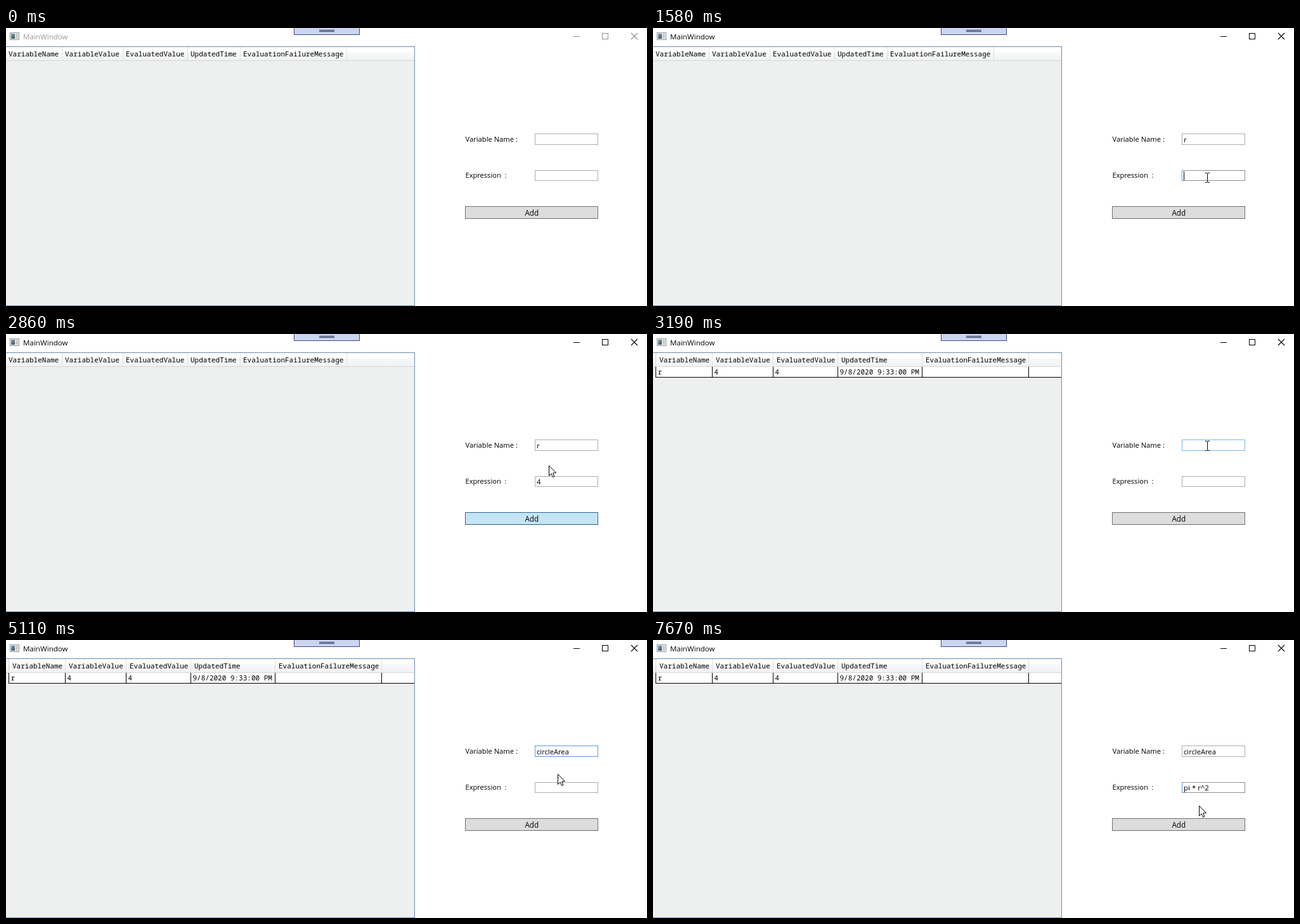
Recreate the animation shown at these times as an HTML page with a canvas. Size 1011x440 px, loop 8 s.

```html
<!DOCTYPE html>
<html lang="en">
<head>
<meta charset="utf-8">
<title>MainWindow</title>
<style>
  html, body { margin: 0; width: 100%; height: 100%; overflow: hidden; background: #fff; }
  canvas { display: block; }
</style>
</head>
<body>
<canvas id="stage" width="1011" height="440"></canvas>
<script>
const ctx = document.getElementById('stage').getContext('2d');
const LOOP = 8000;
const UI = '"Open Sans", "Noto Sans", sans-serif';
const MONO = '"Noto Sans Mono", "Liberation Mono", monospace';
const IDLE = '#abadb3', HOVER = '#7eb4ea', FOCUS = '#569de5';

// Each step changes part of the state and holds until the next one.
const steps = [
  [0, { active: false, name: '', expr: '', nameEdge: IDLE, exprEdge: IDLE,
        caret: null, cursor: null, pressed: false, row: false }],
  [300, { nameEdge: HOVER, cursor: ['beam', 881, 176] }],
  [630, { active: true, nameEdge: FOCUS, caret: 'name', cursor: ['beam', 881, 171] }],
  [940, { name: 'r', cursor: null }],
  [1270, { caret: null, exprEdge: HOVER, cursor: ['beam', 874, 229] }],
  [1580, { nameEdge: IDLE, exprEdge: FOCUS, caret: 'expr' }],
  [2220, { expr: '4', cursor: null }],
  [2550, { caret: null, cursor: ['arrow', 836, 282] }],
  [2860, { exprEdge: IDLE, pressed: true, cursor: ['arrow', 856, 208] }],
  [3190, { row: true, pressed: false, name: '', expr: '', nameEdge: HOVER,
           cursor: ['beam', 874, 169] }],
  [3500, { nameEdge: FOCUS, caret: 'name' }],
  [4140, { name: 'cir', cursor: null }],
  [4470, { name: 'circle' }],
  [4800, { name: 'circleArea' }],
  [5110, { caret: null, cursor: ['arrow', 870, 212] }],
  [5440, { nameEdge: IDLE, exprEdge: FOCUS, caret: 'expr', cursor: ['beam', 869, 229] }],
  [5750, { expr: 'p', cursor: null }],
  [6080, { expr: 'pi ' }],
  [6390, { expr: 'pi * ' }],
  [6720, { expr: 'pi * r' }],
  [7360, { expr: 'pi * r^2' }],
  [7670, { caret: null, cursor: ['arrow', 861, 262] }]
];

const columns = ['VariableName', 'VariableValue', 'EvaluatedValue', 'UpdatedTime',
                 'EvaluationFailureMessage'];
const emptyEdges = [88, 184, 286, 369, 537];
const filledEdges = [93, 189, 291, 424, 592];
const cells = ['r', '4', '4', '9/8/2020 9:33:00 PM'];

function stateAt(t) {
  const state = {};
  for (const [start, change] of steps) if (start <= t) Object.assign(state, change);
  return state;
}

function rect(x, y, w, h, color) {
  ctx.fillStyle = color;
  ctx.fillRect(x, y, w, h);
}

function frame(x, y, w, h, edge, fill) {
  rect(x, y, w, h, edge);
  rect(x + 1, y + 1, w - 2, h - 2, fill);
}

function text(str, x, y, size, family = UI, color = '#000') {
  ctx.font = `${size}px ${family}`;
  ctx.fillStyle = color;
  ctx.fillText(str, x, y);
}

function path(points, closed) {
  ctx.beginPath();
  points.forEach(([x, y]) => ctx.lineTo(x, y));
  if (closed) ctx.closePath();
}

function titleBar(active) {
  const ink = active ? '#000' : '#8f8f8f';
  frame(6, 7, 15, 12, '#8c9296', '#f7f8f8');
  const shade = ctx.createLinearGradient(8, 9, 13, 17);
  shade.addColorStop(0, '#7d9dac');
  shade.addColorStop(1, '#3f5964');
  rect(8, 9, 6, 8, shade);
  rect(15, 9, 4, 8, '#c6cdd0');
  text('MainWindow', 27, 18, 11.6, UI, active ? '#000' : '#999');

  frame(454, -1, 104, 12, '#3f4682', '#ccd5f0');
  rect(494, 3, 24, 1, '#1e2450');
  rect(494, 5, 24, 1, '#1e2450');

  rect(895, 13, 10, 1, ink);
  frame(940, 8, 10, 10, ink, '#fff');
  ctx.strokeStyle = ink;
  ctx.lineWidth = 1.1;
  path([[986, 8], [996, 18]]);
  ctx.stroke();
  path([[996, 8], [986, 18]]);
  ctx.stroke();
}

function grid(filled) {
  const edges = filled ? filledEdges : emptyEdges;
  const left = filled ? 5 : -1;
  rect(0, 29, 645, 411, '#688caf');
  rect(0, 30, 644, 409, '#eef0f0');

  const shade = ctx.createLinearGradient(0, 30, 0, 51);
  shade.addColorStop(0, '#fff');
  shade.addColorStop(0.4, '#fff');
  shade.addColorStop(0.41, '#f7f8fa');
  shade.addColorStop(1, '#f1f2f4');
  rect(0, 30, 644, 21, shade);
  rect(0, 51, 644, 1, '#d5d5d5');
  if (filled) rect(4, 30, 1, 22, '#d5d5d5');
  columns.forEach((label, i) => {
    const x = i ? edges[i - 1] + (filled ? 6 : 5) : left + 5;
    text(label, x, 45, 11, MONO);
    rect(edges[i], 30, 1, 22, '#dedfe1');
  });
  if (!filled) return;

  rect(5, 52, 639, 16, '#fff');
  rect(4, 68, 640, 1, '#000');
  [4, ...edges].forEach(x => rect(x, 52, 1, 17, '#000'));
  cells.forEach((value, i) => text(value, i ? edges[i - 1] + 3.5 : 7.5, 64, 11, MONO));
}

function field(y, h, value, edge, size, caret) {
  frame(834, y, 100, h, edge, '#fff');
  text(value, 837, y + h - 4, size);
  if (caret) {
    const x = Math.floor(837 + ctx.measureText(value).width);
    rect(x, y + 2, 1, h - 3, '#000');
  }
}

function form(s) {
  text('Variable Name :', 724.5, 180, 11.2);
  text('Expression  :', 724.5, 237, 11.1);
  field(167, 18, s.name, s.nameEdge, 11.2, s.caret === 'name');
  const exprEdge = s.exprEdge === FOCUS ? '#8a9299' : s.exprEdge;
  field(225, 17, s.expr, exprEdge, 11.5, s.caret === 'expr');
  if (s.exprEdge === FOCUS) rect(834, 225, 1, 17, FOCUS);

  if (s.pressed) frame(724, 282, 210, 20, '#2c628b', '#c4e5f6');
  else frame(724, 282, 210, 20, '#707070', '#ddd');
  ctx.textAlign = 'center';
  text('Add', 829.3, 297, 11.7);
  ctx.textAlign = 'left';
}

function beam(x, y) {
  rect(x, y + 1, 1, 14, '#000');
  [y, y + 15].forEach(row => {
    rect(x - 3, row, 3, 1, '#000');
    rect(x + 1, row, 3, 1, '#000');
  });
}

function arrow(x, y) {
  ctx.save();
  ctx.translate(x + 0.5, y + 0.5);
  path([[0, 0], [0, 16], [3.6, 12.5], [6, 18], [8.4, 17], [6.2, 11.5], [11, 11.2]], true);
  ctx.fillStyle = '#fff';
  ctx.fill();
  ctx.strokeStyle = '#000';
  ctx.lineWidth = 1;
  ctx.stroke();
  ctx.restore();
}

function draw(t) {
  const s = stateAt(t);
  rect(0, 0, 1011, 440, '#fff');
  titleBar(s.active);
  grid(s.row);
  form(s);
  if (s.cursor) {
    const [shape, x, y] = s.cursor;
    (shape === 'beam' ? beam : arrow)(x, y);
  }
}

const began = performance.now();
function tick() {
  draw((performance.now() - began) % LOOP);
  requestAnimationFrame(tick);
}
tick();
</script>
</body>
</html>
```
